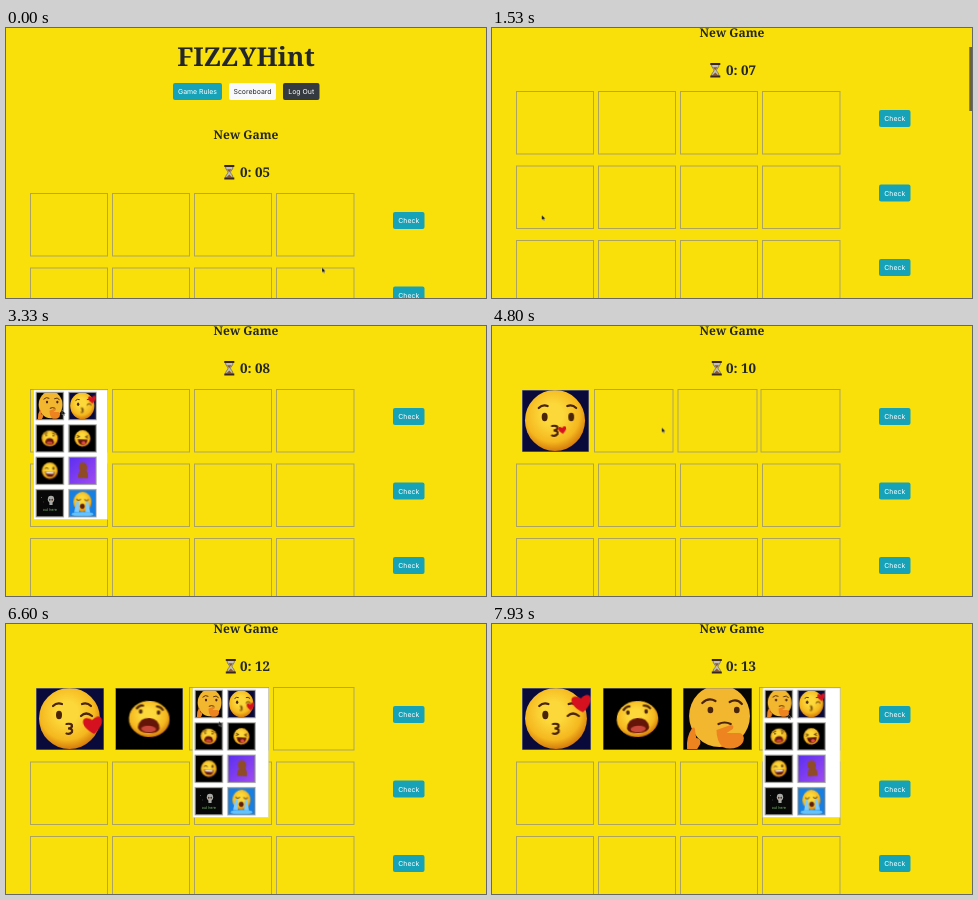
These frames come from a looping animation (480x270 px, 8000 ms). An HTML page:

```html
<!DOCTYPE html>
<html lang="en">
<head>
<meta charset="utf-8">
<title>Memory game</title>
<style>
  html, body { margin: 0; width: 100%; height: 100%; overflow: hidden; background: #f9e00b; }
  #stage { display: block; width: 100%; height: 100%; text-rendering: geometricPrecision; }
  .fancy { font-family: "Noto Serif", serif; font-weight: 700; fill: #23272b; text-anchor: middle; }
  .button text { font: 6.9px Inter, sans-serif; text-anchor: middle; }
  .cell { fill: none; stroke: #aca362; }
  .frame { fill: none; stroke: #8b8b86; vector-effect: non-scaling-stroke; }
  .line { fill: none; stroke: #4a2408; stroke-width: 2.2; stroke-linecap: round; }

  #page { animation: scroll 8s infinite; }
  #thumb { animation: thumb 8s infinite, fade 8s linear infinite; }
  #cursor { animation: point 8s ease-in-out infinite; }
  .heart { animation: blow calc(8s / 7) linear infinite; }
  .open-eye { animation: open calc(8s / 7) step-end infinite; }
  .wink-eye { animation: wink calc(8s / 7) step-end infinite; }
  .wobble { transform-box: fill-box; transform-origin: center; animation: wobble 1s ease-in-out infinite; }

  @keyframes scroll {
    0%, 11.3% { transform: none; animation-timing-function: cubic-bezier(.25, .25, .45, 1); }
    19.2%, 100% { transform: translateY(-102px); }
  }
  @keyframes thumb {
    0%, 11.3% { transform: translateY(-5px); animation-timing-function: cubic-bezier(.25, .25, .45, 1); }
    19.2%, 100% { transform: translateY(19px); }
  }
  @keyframes fade {
    0%, 11.3% { opacity: 0; }
    11.7%, 27.5% { opacity: 1; }
    31%, 100% { opacity: 0; }
  }
  @keyframes point {
    0%, .9% { transform: translate(316px, 239.5px); }
    7.5%, 23% { transform: translate(49.7px, 187px); }
    31%, 34.5% { transform: translate(55px, 98px); }
    41.6% { transform: translate(56px, 84px); }
    46.5%, 50% { transform: translate(76px, 84px); }
    58.7%, 64.5% { transform: translate(169.7px, 101.5px); }
    70%, 73% { transform: translate(121px, 114px); }
    78.7%, 80.5% { transform: translate(215px, 100px); }
    87%, 89.5% { transform: translate(204px, 86px); }
    95%, 96.5% { transform: translate(300px, 98px); }
    99%, 100% { transform: translate(296px, 90px); }
  }
  @keyframes blow {
    0%, 25% { transform: translate(41px, 40px) scale(.42); opacity: 1; }
    77% { transform: translate(57px, 38px) scale(1); }
    90% { transform: translate(58px, 17px) scale(1); }
    95% { transform: translate(59px, 15px) scale(1); opacity: 1; }
    99%, 100% { transform: translate(66px, -16px) scale(1); opacity: 0; }
  }
  @keyframes open { 0%, 100% { opacity: 1; } 45% { opacity: 0; } }
  @keyframes wink { 0%, 100% { opacity: 0; } 45% { opacity: 1; } }
  @keyframes wobble {
    0%, 100% { transform: rotate(-4deg); }
    50% { transform: rotate(4deg); }
  }
</style>
</head>
<body>
<svg id="stage" viewBox="0 0 480 270" preserveAspectRatio="none">
  <defs>
    <radialGradient id="skin" cx=".46" cy=".4" r=".6">
      <stop offset=".3" stop-color="#fcd83a"/>
      <stop offset=".75" stop-color="#f5b81f"/>
      <stop offset="1" stop-color="#d57c0c"/>
    </radialGradient>
    <linearGradient id="dusk" x2="1" y2="1">
      <stop stop-color="#5b2ff0"/>
      <stop offset="1" stop-color="#a24bf0"/>
    </linearGradient>
  </defs>
  <rect width="480" height="270" fill="#f9e00b"/>
  <g id="page">
    <text class="fancy" x="240" y="38" font-size="26">FIZZYHint</text>
    <g id="nav"></g>
    <text class="fancy" x="240" y="110.5" font-size="12">New Game</text>
    <g id="hourglass">
      <path d="M2 1.5h7.5C9.5 5 7 5.7 7 7.2S9.5 9.8 9.5 13H2c0-3.200 2.500-4.300 2.500-5.800S2 5 2 1.500z" fill="#c4c1b4" stroke="#6b6a60" stroke-width=".8"/>
      <path d="M3.500 4.300H8L5.750 7.200zM2.800 12.500l3-3 3 3z" fill="#8f5a2a"/>
      <path d="M.8 0h10v2H.8zM.8 12.500h10v2H.8z" fill="#38261f"/>
    </g>
    <text class="fancy" id="clock" x="249" y="149" font-size="13.4"></text>
    <g id="rows"></g>
    <g id="tiles"></g>
    <g id="menu"></g>
  </g>
  <rect id="thumb" x="477.300" width="2.700" height="64" fill="#696331"/>
  <path id="cursor" d="M0 0v5l1.200-1 .8 1.700.9-.4-.8-1.500h1.600z" fill="#111" stroke="#fff" stroke-width=".25"/>
</svg>
<script>
const $ = id => document.getElementById(id);
const LOOP = 8000, ROW_TOP = 165.5, ROW_STEP = 74.5, TILE_H = 62;

// Menu opening and picking times, one pair per cell of the first row.
const turns = [[2700, 3900], [5100, 5800], [6400, 7100], [7700, Infinity]];
// Left edge and width of each cell, by number of filled cells.
const layouts = [
  [[24.5, 77], [106.5, 77], [188.5, 77], [270.5, 77.5]],
  [[30, 67], [102.5, 78.5], [186, 79], [269, 79]],
  [[30, 68], [109.5, 67.5], [183.5, 79], [267.5, 80.5]],
  [[30, 69], [111, 69], [191, 69], [267.5, 80.5]]
];

const oval = (x, y, rx, ry, fill) =>
  `<ellipse cx="${x}" cy="${y}" rx="${rx}" ry="${ry}" fill="${fill}"/>`;
const line = d => `<path class="line" d="${d}"/>`;
const eyes = (x1, x2, y, rx = 2.2, ry = 3) =>
  oval(x1, y, rx, ry, '#4a2408') + oval(x2, y, rx, ry, '#4a2408');
const head = (x, y, rx, ry = rx) => oval(x, y, rx, ry, 'url(#skin)');
const wobble = art => `<g class="wobble">${art}</g>`;

// Each picture is drawn on a 68 by 62 ground.
const pictures = {
  thinking: ['#080604',
    oval(36, 28, 30, 31, '#f3b62f') +
    line('M19 15q6-6 13-2M46 14q7-4 12 2') +
    eyes(27, 53, 22, 2.8, 3.2) + line('M35 36q6-3 12 0') +
    '<path d="M33 42l14-5q4 0 2 4l-6 4 12 0q4 0 5 5 0 6-6 9-8 3-15 0-6-6-6-17z" fill="#ee8420"/>' +
    '<path d="M4 61q-1-12 5-21 3-2 3 3l1 7q5 0 4 6l-3 5z" fill="#ee8420"/>'],
  kiss: ['#09093a',
    head(33.5, 30.5, 30.5) +
    line('M17 18q4-4 9-2M46 16q5-2 9 2') +
    oval(23, 27, 3, 4.2, '#4a2408') +
    `<g class="open-eye">${oval(50, 27, 3, 4.2, '#4a2408')}</g>` +
    `<g class="wink-eye">${line('M45 28q5-5 11 0')}</g>` +
    line('M30.500 36q6-1 5.500 2.500-1 2-4 2 5 0 4 3.500-2 2.500-5.500 1.500') +
    '<g class="heart"><path d="M0 9C-16-2-9-13 0-5 9-13 16-2 0 9z" fill="#d6111f" transform="rotate(-8)"/></g>'],
  scream: ['#000', wobble(
    head(34, 31, 20.5, 18) + line('M21 21q3-4 6-3M41 18q4 0 6 3') +
    eyes(25, 43, 24, 1.8, 2.2) +
    '<path d="M23 40q1-10 11-10t11 10q-1 5-11 5t-11-5z" fill="#651408"/>' + oval(34, 41, 7.5, 3.2, '#c9473a'))],
  laugh: ['#000', wobble(
    head(34, 31, 20, 19) + line('M21 25l6 2-6 2M47 25l-6 2 6 2') +
    '<path d="M22 33h25q-2 13-12 13T22 33z" fill="#641308"/>' + oval(37, 41, 5, 4, '#e74c4c'))],
  grin: ['#000', wobble(
    head(34, 31, 20, 19) + line('M22 26q4-4 8 0') + oval(43, 25, 2.4, 3.4, '#4a2408') +
    '<path d="M22 33h25q-2 12-12 12T22 33z" fill="#641308"/><path d="M24 34h21l-2 4H26z" fill="#fff"/>')],
  figure: ['url(#dusk)', wobble(
    '<path d="M27 14q10-6 17 3 3 9 0 13 6 7 4 18H24q-3-9 4-17-6-8-1-17z" fill="#8f4b25"/>')],
  skull: ['#080808',
    oval(37, 22, 8, 8, '#a9aaa6') + '<path d="M33 27h8v8h-8z" fill="#a9aaa6"/>' +
    eyes(34, 40, 23, 1.8, 2.4) + oval(13, 18, 1.2, 1.2, '#777') + oval(18, 28, 1, 1, '#777') +
    '<text x="34" y="50" font-family="Inter, sans-serif" font-size="9" fill="#7fbf6a" text-anchor="middle">out here</text>'],
  crying: ['#187fe2', wobble(
    head(34, 28, 23) + line('M19 23q5 4 10 0M39 23q5 4 10 0') +
    oval(34, 38, 6, 6, '#5c1d0d') +
    '<path d="M19 27h6l1 25H14zM43 27h6l5 25H42z" fill="#7fccff"/>') + oval(34, 56, 28, 5, '#65c3fb')]
};

const picture = (name, x, y, w, h) => {
  const [ground, art] = pictures[name];
  return `<svg x="${x}" y="${y}" width="${w}" height="${h}" viewBox="0 0 68 62" preserveAspectRatio="none">
    <rect width="68" height="62" fill="${ground}"/>${art}<rect class="frame" width="68" height="62"/></svg>`;
};

const button = (label, x, y, w, fill, ink = '#fff') =>
  `<g class="button"><rect x="${x}" y="${y}" width="${w}" height="17" rx="2" fill="${fill}"/>
   <text x="${x + w / 2}" y="${y + 11}" fill="${ink}">${label}</text></g>`;

$('nav').innerHTML =
  button('Game Rules', 167, 55, 49, '#17a2b8') +
  button('Scoreboard', 223, 55, 47, '#f8f9fa', '#212529') +
  button('Log Out', 277, 55, 36.5, '#343a40');

$('rows').innerHTML = [0, 1, 2].map(row => {
  const y = ROW_TOP + row * ROW_STEP;
  return layouts[0].map(([x, w]) =>
    `<rect class="cell" x="${x}" y="${y}" width="${w}" height="62.5"/>`).join('') +
    button('Check', 387, y + 18.5, 31.5, '#17a2b8');
}).join('');

$('tiles').innerHTML = ['kiss', 'scream', 'thinking']
  .map(name => picture(name, 0, ROW_TOP + .5, 68, TILE_H)).join('');

$('menu').innerHTML = '<rect id="panel" height="129.5" fill="#fff" stroke="#c9c9c0" stroke-width=".5"/>' +
  Object.keys(pictures).map((name, i) => {
    const x = 1.7 + i % 2 * 32.7, y = 1.7 + (i >> 1) * 32.4;
    return `<rect x="${x}" y="${y}" width="28.6" height="28.6" fill="#b5b5b2"/>` +
      picture(name, x + .8, y + .8, 27, 27);
  }).join('');

const cells = [...$('rows').querySelectorAll('.cell')].slice(0, 4);
const tiles = [...$('tiles').children];
const rules = $('nav').querySelector('rect');
const show = (node, on) => { node.style.visibility = on ? 'visible' : 'hidden'; };
const place = (node, x, width) => {
  node.setAttribute('x', x);
  node.setAttribute('width', width);
};

function draw(t) {
  const seconds = 5 + Math.floor((t + 490) / 1000);
  $('clock').textContent = `0: ${String(seconds).padStart(2, '0')}`;
  $('hourglass').setAttribute('transform', `translate(${seconds < 10 ? 217.5 : 219} 137)`);

  const focused = t >= 70;
  rules.setAttribute('fill', focused ? '#138496' : '#17a2b8');
  rules.setAttribute('stroke', focused ? '#62b583' : 'none');

  const filled = turns.filter(([, picked]) => t >= picked).length;
  layouts[filled].forEach(([x, w], i) => {
    place(cells[i], x, w);
    show(cells[i], i >= filled);
    if (tiles[i]) {
      place(tiles[i], x, w);
      show(tiles[i], i < filled);
    }
  });

  const [x, w] = layouts[filled][filled];
  const inset = 3.3;
  show($('menu'), t >= turns[filled][0]);
  $('menu').setAttribute('transform', `translate(${x + inset} ${ROW_TOP + .5})`);
  $('panel').setAttribute('width', w - inset);
}

const scrolling = $('page').getAnimations()[0];
function tick() {
  draw((scrolling.currentTime || 0) % LOOP);
  requestAnimationFrame(tick);
}
tick();
</script>
</body>
</html>
```
